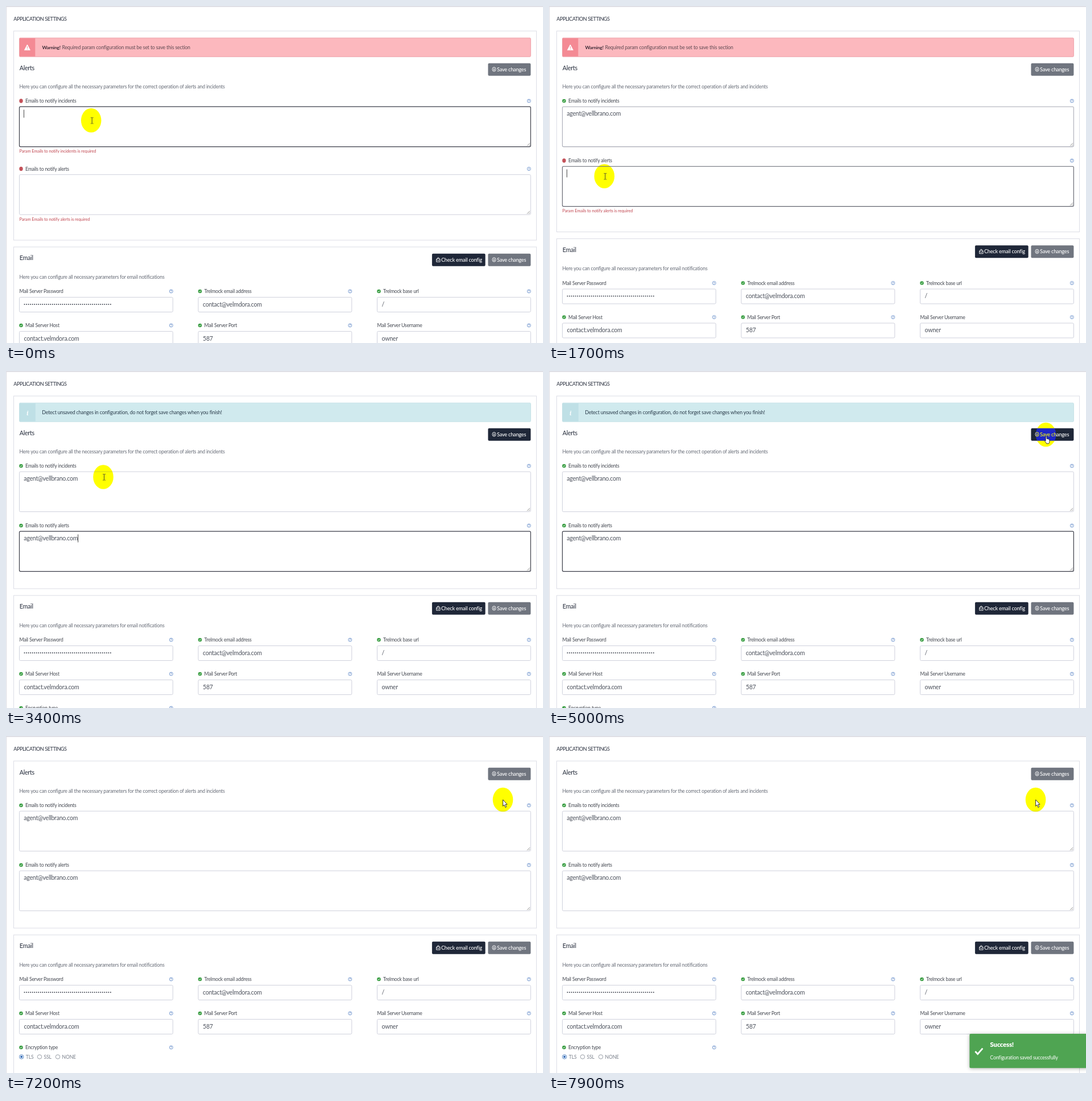
Recreate the animation shown at these times as an HTML page. Size 944 by 593 pixels, loop 8 s.

```html
<!DOCTYPE html>
<html lang="en">
<head>
<meta charset="utf-8">
<title>Application settings</title>
<style>
  html, body { margin: 0; width: 100%; height: 100%; overflow: hidden; background: #fff; }
  svg { display: block; width: 100vw; height: 100vh; font-family: Lato, "Open Sans", sans-serif; }
  text { white-space: pre; letter-spacing: -.022em; }
  .title { font-size: 9.1px; letter-spacing: -.05em; fill: #2c3240; }
  .head { font-size: 10.7px; fill: #262d3c; }
  .desc { font-size: 8.7px; fill: #666b76; }
  .label { font-size: 8.6px; fill: #42464f; }
  .value { font-size: 10.55px; fill: #4d525d; }
  .error { font-size: 7.55px; fill: #c24a54; }
  .warn { font-size: 8.8px; fill: #5f4a52; }
  .info { font-size: 8.9px; fill: #2b3d4c; }
  .button { font-size: 9.1px; font-weight: 500; fill: #fff; }
  .option { font-size: 8.6px; fill: #7b818c; }
  .strong { font-size: 8.4px; font-weight: 700; fill: #3b2a35; }
  .toast-head { font-size: 11.5px; font-weight: 900; fill: #fff; }
  .toast-body { font-size: 8.8px; fill: #fff; }
  .box { fill: #fff; stroke: #cfd1dc; }
  .panel { fill: #fff; stroke: #dcdde6; }
  #spot { mix-blend-mode: difference; }
  #toast { filter: drop-shadow(0 1px 3px rgba(0, 0, 0, .3)); }
</style>
</head>
<body>
<svg id="stage" viewBox="0 0 944 593" preserveAspectRatio="none"></svg>
<script>
const LOOP = 8000;
const PASTE_1 = 250, FOCUS_2 = 1590, PASTE_2 = 2300, SAVED = 6900, TOAST = 7414;
const BANNER_H = 45, ERROR_H = 14.5, BLINK = 530;
const DARK = '#1f2738', GREY = '#70757f';
const EMAIL = 'agent@vellbrano.com';
const COLS = [23.5, 338, 652.5];

// Pointer path: time, x, y
const PATH = [
  [0, 149.7, 201.3], [600, 149.7, 201.3], [950, 108, 222], [1400, 97.3, 299.5],
  [2650, 97.3, 299.5], [3000, 168, 264], [3300, 171, 186.5], [3550, 171, 186.5],
  [4200, 922, 104], [4400, 902, 103], [4700, 873.5, 112], [7700, 873.5, 112], [7900, 855.5, 112]
];

const text = (x, y, cls, str) => `<text x="${x}" y="${y}" class="${cls}">${str}</text>`;
const group = (id, body) => `<g id="${id}">${body}</g>`;
const rect = (x, y, w, h, attrs) => `<rect x="${x}" y="${y}" width="${w}" height="${h}" ${attrs}/>`;

const okIcon = (x, y, id = '') => `<g ${id && `id="${id}"`}><circle cx="${x}" cy="${y}" r="3.3" fill="#3c9f45"/>
  <path d="M${x - 1.5} ${y}l1.1 1.2 2-2.3" fill="none" stroke="#fff" stroke-width=".9"/></g>`;
const badIcon = (x, y, id) => `<ellipse id="${id}" cx="${x}" cy="${y}" rx="3.2" ry="3.7" fill="#c4525a"/>`;
const helpIcon = (x, y) => `<circle cx="${x}" cy="${y}" r="3" fill="none" stroke="#6a90cb" stroke-width=".9"/>
  <text x="${x}" y="${y + 2}" font-size="5.4" font-weight="700" text-anchor="middle" fill="#557fc2">?</text>`;

function saveButton(y, id, fill) {
  return rect(847.4, y, 75, 22, `id="${id}" rx="2" fill="${fill}"`) +
    `<g fill="none" stroke="#fff" stroke-width=".9"><ellipse cx="858" cy="${y + 10.6}" rx="3.1" ry="3.7"/>
    <path d="M858 ${y + 8.4}v4M856.5 ${y + 10.9}l1.5 1.6 1.5-1.6"/></g>` +
    text(863, y + 14, 'button', 'Save changes');
}

function checkButton(y) {
  return rect(748.9, y, 93.7, 22, `rx="2" fill="${DARK}"`) +
    `<path d="M756.6 ${y + 9.6}l3.2-3 3.2 3v4.8h-6.4zM756.6 ${y + 10}l3.2 2.4 3.2-2.4M758 ${y + 8.7}h3.6"
    fill="none" stroke="#fff" stroke-width=".9"/>` +
    text(765, y + 14, 'button', 'Check email config');
}

function area(n, y, name) {
  return group('field' + n,
    badIcon(26.5, y, 'bad' + n) + okIcon(26.5, y, 'ok' + n) +
    text(34, y + 3, 'label', name) + helpIcon(919.3, y) +
    rect(23.5, y + 10.2, 898.8, 70.4, `id="area${n}" class="box" rx="2"`) +
    `<path d="M916 ${y + 79.2}l5-5M919 ${y + 79.2}l2-2" stroke="#777" stroke-width=".8"/>` +
    text(31.3, y + 25.7, 'value', `<tspan id="value${n}">${EMAIL}</tspan>`) +
    group('error' + n, text(23.5, y + 91, 'error', `Param ${name} is required`)) +
    rect(31, y + 15.5, .9, 14, `id="caret${n}" fill="#333"`));
}

function input(col, y, name, value, ok) {
  const x = COLS[col];
  return (ok ? okIcon(x + 3, y) : '') + text(x + (ok ? 10.5 : 0), y + 3, 'label', name) +
    helpIcon(x + 266.8, y) + rect(x, y + 10.5, 269.8, 26, 'class="box" rx="2"') +
    (value ? text(x + 8, y + 26.5, 'value', value) : '');
}

function radio(x, name, on) {
  return `<circle cx="${x}" cy="214.5" r="3.7" fill="#fff" stroke="${on ? '#3f76bd' : '#8d929c'}" stroke-width=".9"/>` +
    (on ? `<circle cx="${x}" cy="214.5" r="1.9" fill="#3068b5"/>` : '') +
    text(x + 7.6, 217.5, 'option', name);
}

const warning = rect(23.5, 56.2, 898.8, 33, 'rx="1.5" fill="#fcb8be" stroke="#eda0a8"') +
  rect(24, 56.7, 27.3, 32, 'fill="#f48a94"') +
  `<path d="M37.4 68l5 9.6h-10z" fill="#fff" stroke="#fff" stroke-width=".8" stroke-linejoin="round"/>
  <path d="M37.4 71v3.4M37.4 75.4v1.2" stroke="#f48a94" stroke-width="1"/>` +
  text(63.4, 75.8, 'strong', 'Warning!') +
  text(98.4, 75.8, 'warn', 'Required param configuration must be set to save this section');

const notice = rect(23.5, 56.2, 898.8, 33, 'rx="1.5" fill="#d0eaee" stroke="#c5e2e7"') +
  rect(24, 56.7, 27.8, 32, 'fill="#bfe0e6"') +
  '<text x="36" y="78.2" font-family="Noto Serif, serif" font-size="10" font-style="italic" font-weight="700" fill="#fff">i</text>' +
  text(63.2, 75.8, 'info', 'Detect unsaved changes in configuration, do not forget save changes when you finish!');

const alerts = text(23.7, 112.5, 'head', 'Alerts') + saveButton(100.8, 'save', GREY) +
  text(23.5, 144.9, 'desc', 'Here you can configure all the necessary parameters for the correct operation of alerts and incidents') +
  area(1, 167, 'Emails to notify incidents') + area(2, 272, 'Emails to notify alerts');

const email = rect(13.5, 0, 919, 420, 'class="panel"') + text(23.7, 23.3, 'head', 'Email') +
  checkButton(11.8) + saveButton(11.8, 'save2', GREY) +
  text(23.5, 55.9, 'desc', 'Here you can configure all necessary parameters for email notifications') +
  input(0, 78, 'Mail Server Password', '', false) +
  '<path d="M32.5 101h152" stroke="#454a55" stroke-width="2" stroke-linecap="round" stroke-dasharray="0 3.52"/>' +
  input(1, 78, 'Trelmock email address', 'contact@velmdora.com', true) +
  input(2, 78, 'Trelmock base url', '/', true) +
  input(0, 138, 'Mail Server Host', 'contact.velmdora.com', true) +
  input(1, 138, 'Mail Server Port', '587', true) +
  input(2, 138, 'Mail Server Username', 'owner', false) +
  okIcon(26.5, 198) + text(34, 201, 'label', 'Encryption type') + helpIcon(290.3, 198) +
  radio(27.2, 'TLS', true) + radio(59, 'SSL') + radio(91, 'NONE');

const toast = rect(0, 524, 208.5, 60.3, 'rx="2" fill="#4fa452"') +
  '<path d="M10 555l4.3 4.7 8.7-10" fill="none" stroke="#fff" stroke-width="2.8"/>' +
  text(36, 547.2, 'toast-head', 'Success!') +
  text(36, 569.2, 'toast-body', 'Configuration saved successfully');

const pointers =
  group('beam', '<path d="M-.7-5h1.7M2-5h1.7M1.5-4.6v9.8M-.7 5.6h1.7M2 5.6h1.7" stroke="#333" stroke-width=".9" fill="none"/>') +
  group('arrow', '<path d="M0 0v11.5l2.4-2.5 1.9 4.6 1.9-.9-1.9-4.3h3.2z" fill="#fff" stroke="#222" stroke-width=".9"/>') +
  group('hand', '<path d="M-.4 9V3.2q1-1.4 2 0v4l1.6.3 1.6.5 1.6.6v4q-.4 2-1.4 3.2h-3.9q-1.2-2.4-3.5-5 0-1.4 2 .2z" fill="#fff" stroke="#222" stroke-width=".9"/>');

const stage = document.getElementById('stage');
stage.innerHTML = rect(0, 0, 944, 593, 'fill="#fff"') +
  rect(0, 0, 944, 1.6, 'fill="#d9d9e0"') + rect(0, 0, 1.2, 593, 'fill="#dfdfe6"') +
  text(13.3, 26.2, 'title', 'APPLICATION SETTINGS') +
  rect(13.5, 44, 919, 300, 'id="panel" class="panel"') +
  group('warning', warning) + group('notice', notice) + group('alerts', alerts) +
  group('email', email) + group('toast', toast) +
  '<ellipse id="spot" rx="17.8" ry="21.3" fill="#00f"/>' + group('pointer', pointers);

const el = {};
stage.querySelectorAll('[id]').forEach(node => el[node.id] = node);

const clamp = v => Math.max(0, Math.min(1, v));
const show = (id, on) => el[id].setAttribute('visibility', on ? 'visible' : 'hidden');
const move = (id, x, y) => el[id].setAttribute('transform', `translate(${x} ${y})`);

function pointerAt(t) {
  const i = PATH.findIndex(p => p[0] > t);
  if (i < 0) return PATH[PATH.length - 1].slice(1);
  const [t0, x0, y0] = PATH[i - 1], [t1, x1, y1] = PATH[i];
  const u = (t - t0) / (t1 - t0), k = u * u * (3 - 2 * u);
  return [x0 + (x1 - x0) * k, y0 + (y1 - y0) * k];
}

function drawArea(n, filled, focus, caretOn) {
  show('ok' + n, filled);
  show('bad' + n, !filled);
  show('error' + n, !filled);
  show('value' + n, filled);
  show('caret' + n, caretOn);
  el['caret' + n].setAttribute('x', filled ? 31.3 + el['value' + n].getComputedTextLength() : 31);
  const mix = (a, b) => Math.round(a + (b - a) * focus);
  el['area' + n].style.stroke = `rgb(${mix(207, 58)},${mix(209, 60)},${mix(220, 72)})`;
  el['area' + n].style.strokeWidth = 1 + .2 * focus;
}

function draw(t) {
  const filled1 = t >= PASTE_1, filled2 = t >= PASTE_2, saved = t >= SAVED;
  const lift = saved ? BANNER_H : 0;
  const gap1 = filled1 ? 0 : ERROR_H, gap2 = filled2 ? 0 : ERROR_H;
  const bottom = 383 + gap1 + gap2 - lift;

  show('warning', !filled2);
  show('notice', filled2 && !saved);
  el.save.setAttribute('fill', filled2 && !saved ? DARK : GREY);
  el.panel.setAttribute('height', bottom - 44);
  move('alerts', 0, -lift);
  move('field2', 0, gap1);
  move('email', 0, bottom + 12);

  const change = Math.max(...[0, PASTE_1, FOCUS_2, PASTE_2].filter(s => s <= t));
  const blink = Math.floor((t - change) / BLINK) % 2 === 0;
  const shift = clamp((t - FOCUS_2) / 150);
  drawArea(1, filled1, 1 - shift, blink && t < FOCUS_2);
  drawArea(2, filled2, saved ? 0 : shift, blink && t >= FOCUS_2 && !saved);

  const p = clamp((t - TOAST) / 345);
  move('toast', 739.3 - 200 * (1 - p), 0);
  el.toast.setAttribute('opacity', p);

  const [x, y] = pointerAt(t);
  const onButton = !saved && x > 847 && x < 922 && y > 101 && y < 123;
  const inArea = !saved && x < 922 &&
    ((y > 177 && y < 248) || (y > 282 + gap1 && y < 353 + gap1));
  move('spot', x, y);
  move('pointer', x, y);
  show('beam', inArea);
  show('hand', onButton);
  show('arrow', !inArea && !onButton);
}

let start;
function tick(now) {
  start ??= now;
  draw((now - start) % LOOP);
  requestAnimationFrame(tick);
}
draw(0);
requestAnimationFrame(tick);
</script>
</body>
</html>
```
